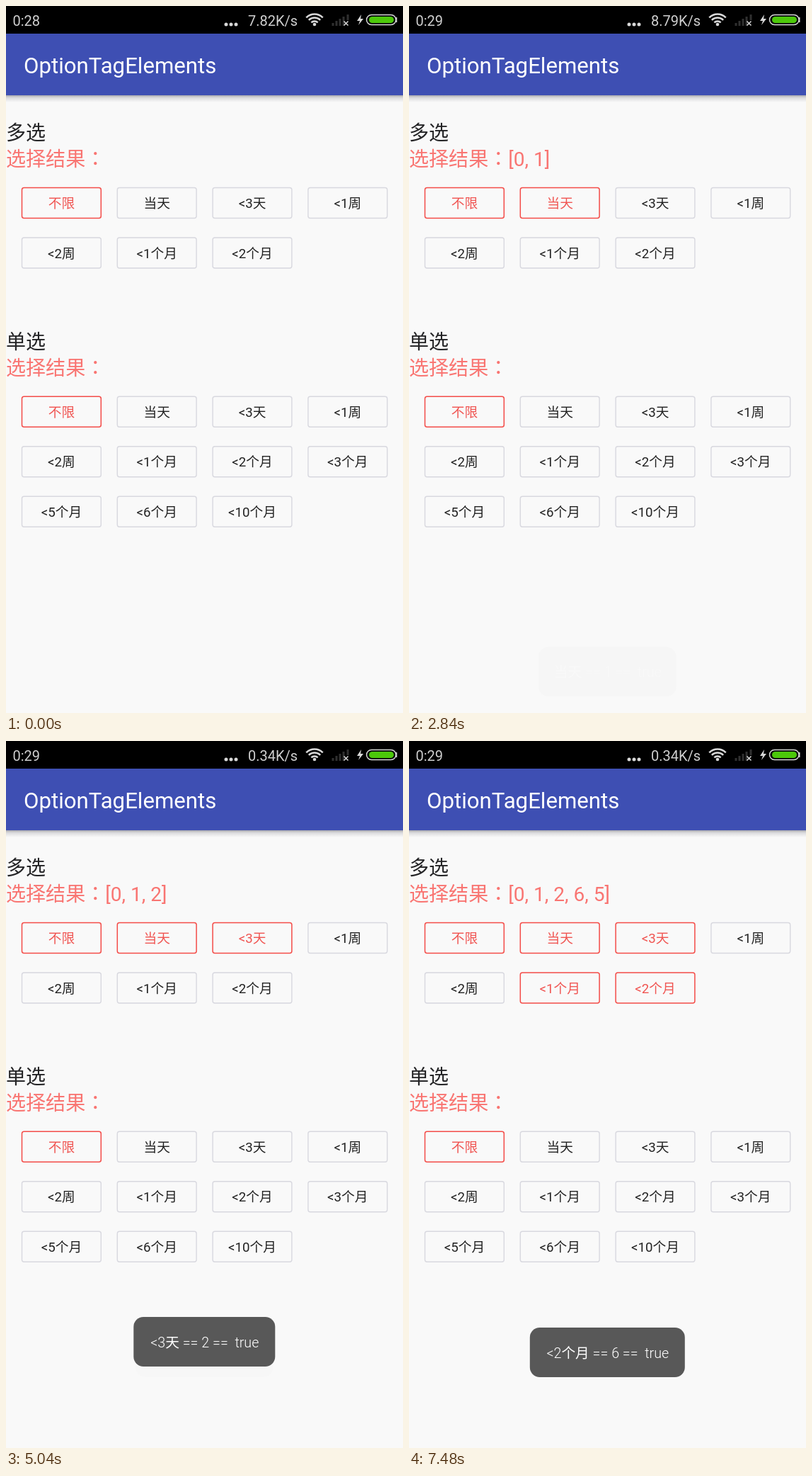
Animation, 561 px wide and 998 px high, one loop 8000 ms. Source, as an HTML page:

```html
<!DOCTYPE html>
<html lang="zh-CN">
<head>
<meta charset="utf-8">
<style>
html, body { margin: 0; width: 100%; height: 100%; overflow: hidden; background: #f9f9f9; }
svg { display: block; width: 561px; height: 998px; }
text { font-family: Roboto, "Noto Sans CJK SC", sans-serif; white-space: pre; }
.status { font-size: 20px; fill: #d0d0d0; }
.title { font-size: 31.2px; fill: #fff; }
.head { font-size: 28.05px; fill: #242426; }
.result { font-size: 28.05px; fill: #f97572; }
.colon { font-family: "Noto Sans CJK JP", sans-serif; }
.option rect { fill: none; stroke: #d8d8df; stroke-width: 1.4; }
.option text { font-size: 18.7px; fill: #222; text-anchor: middle; }
.option.on rect { stroke: #f44c48; stroke-width: 1.5; }
.option.on text { fill: #f05552; }
.toast rect { fill: #585858; }
.toast text { font-size: 19.7px; font-weight: 300; fill: #fff; text-anchor: middle; }
</style>
</head>
<body>
<svg id="stage" viewBox="0 0 561 998">
  <defs>
    <linearGradient id="shade" x2="0" y2="1">
      <stop stop-color="#707078" stop-opacity=".6"/>
      <stop offset=".35" stop-color="#909098" stop-opacity=".3"/>
      <stop offset="1" stop-color="#a0a0a8" stop-opacity="0"/>
    </linearGradient>
  </defs>
  <rect width="561" height="998" fill="#f9f9f9"/>
  <rect y="126" width="561" height="10" fill="url(#shade)"/>
  <rect y="39" width="561" height="87" fill="#3e4fb3"/>
  <rect width="561" height="39" fill="#000"/>
  <text class="status" id="clock" x="9.500" y="28"></text>
  <text class="status" id="speed" x="342" y="28"></text>
  <g fill="#d8d8d8">
    <circle cx="311" cy="26" r="2.5"/>
    <circle cx="318" cy="26" r="2.5"/>
    <circle cx="325" cy="26" r="2.5"/>
    <circle cx="436" cy="26" r="2.3"/>
    <path d="M502 12L496 21H500L498 27L505 18H501Z"/>
    <path d="M551 16h1.5v7h-1.5z"/>
  </g>
  <path id="wifi" fill="none" stroke="#d8d8d8" stroke-width="2.5"/>
  <path d="M462 28v-4M467 28v-7M472 28v-10M477 28v-13M483 20v-8" stroke="#303030" stroke-width="3"/>
  <path d="M477.500 21.500l6 6m0-6l-6 6" stroke="#d8d8d8" stroke-width="1.5"/>
  <rect x="509.500" y="12.500" width="41.500" height="14" rx="7" fill="none" stroke="#d8d8d8" stroke-width="1.5"/>
  <rect x="513" y="15" width="35" height="9" rx="4.500" fill="#4cc80a"/>
  <text class="title" x="25" y="95">OptionTagElements</text>
</svg>
<script>
const stage = document.getElementById('stage');
const byId = id => document.getElementById(id);

function add(parent, tag, attrs, content = '') {
  const node = document.createElementNS('http://www.w3.org/2000/svg', tag);
  for (const key in attrs) node.setAttribute(key, attrs[key]);
  node.textContent = content;
  return parent.appendChild(node);
}

function addSection(title, y, labels) {
  add(stage, 'text', { class: 'head', x: 0, y: y + 11 }, title);
  const line = add(stage, 'text', { class: 'result', x: 0, y: y + 48 });
  add(line, 'tspan', {}, '选择结果');
  // The Japanese glyph sits in the middle of its cell.
  add(line, 'tspan', { class: 'colon', lang: 'ja' }, '\uff1a');
  const value = add(line, 'tspan', {});
  const options = labels.map((label, i) => {
    const x = 22.5 + (i % 4) * 134.8, top = y + 78.5 + Math.floor(i / 4) * 70.5;
    const group = add(stage, 'g', { class: 'option' });
    add(group, 'rect', { x, y: top, width: 111.8, height: 43, rx: 3 });
    add(group, 'text', { x: x + 55.9, y: top + 28.5 }, label);
    return group;
  });
  options[0].classList.add('on');
  return { value, options };
}

const labels = ['不限', '当天', '<3天', '<1周', '<2周', '<1个月', '<2个月'];
const multi = addSection('多选', 178, labels);
addSection('单选', 472.8, [...labels, '<3个月', '<5个月', '<6个月', '<10个月']);

byId('wifi').setAttribute('d', [6.5, 11.5, 16.5].map(r => {
  const d = r * 0.71;
  return `M${436 - d} ${28 - d}A${r} ${r} 0 0 1 ${436 + d} ${28 - d}`;
}).join(''));

// The border reacts to the press, the result line to the release.
const taps = [
  { index: 1, press: 2600, release: 2720 },
  { index: 2, press: 3480, release: 3600 },
  { index: 6, press: 5840, release: 5960 },
  { index: 5, press: 7400, release: 7480 }
];

const toasts = [
  { index: 1, width: 195, start: 2800, leave: 4700 },
  { index: 2, width: 200, start: 4760, leave: 6700 },
  { index: 6, width: 219, start: 6760, leave: 9000 }
].map(toast => {
  const node = add(stage, 'g', { class: 'toast' });
  add(node, 'rect', { x: 280.3 - toast.width / 2, y: 828, width: toast.width, height: 70, rx: 14 });
  add(node, 'text', { x: 280.8, y: 870.5 }, `${labels[toast.index]} == ${toast.index} ==  true`);
  return { ...toast, node };
});

function ease(u) {
  u = Math.min(1, Math.max(0, u));
  return u < 0.5 ? 4 * u ** 3 : 1 - 4 * (1 - u) ** 3;
}

function draw(t) {
  byId('clock').textContent = t < 800 ? '0:28' : '0:29';
  byId('speed').textContent = t < 440 ? '7.82K/s' : t < 4440 ? '8.79K/s' : '0.34K/s';

  for (const { index, press } of taps) multi.options[index].classList.toggle('on', t >= press);
  const chosen = taps.filter(tap => t >= tap.release).map(tap => tap.index);
  multi.value.textContent = chosen.length ? `[${[0, ...chosen].join(', ')}]` : '';

  for (const { node, start, leave } of toasts) {
    const rise = ease((t - start) / 280), settle = ease((t - start - 280) / 200);
    node.setAttribute('transform', `translate(0 ${78 - 93 * rise + 15 * settle})`);
    node.setAttribute('opacity', rise * (1 - ease((t - leave) / 380)));
  }
}

const begin = performance.now();
function tick() {
  draw((performance.now() - begin) % 8000);
  requestAnimationFrame(tick);
}
tick();
</script>
</body>
</html>
```
